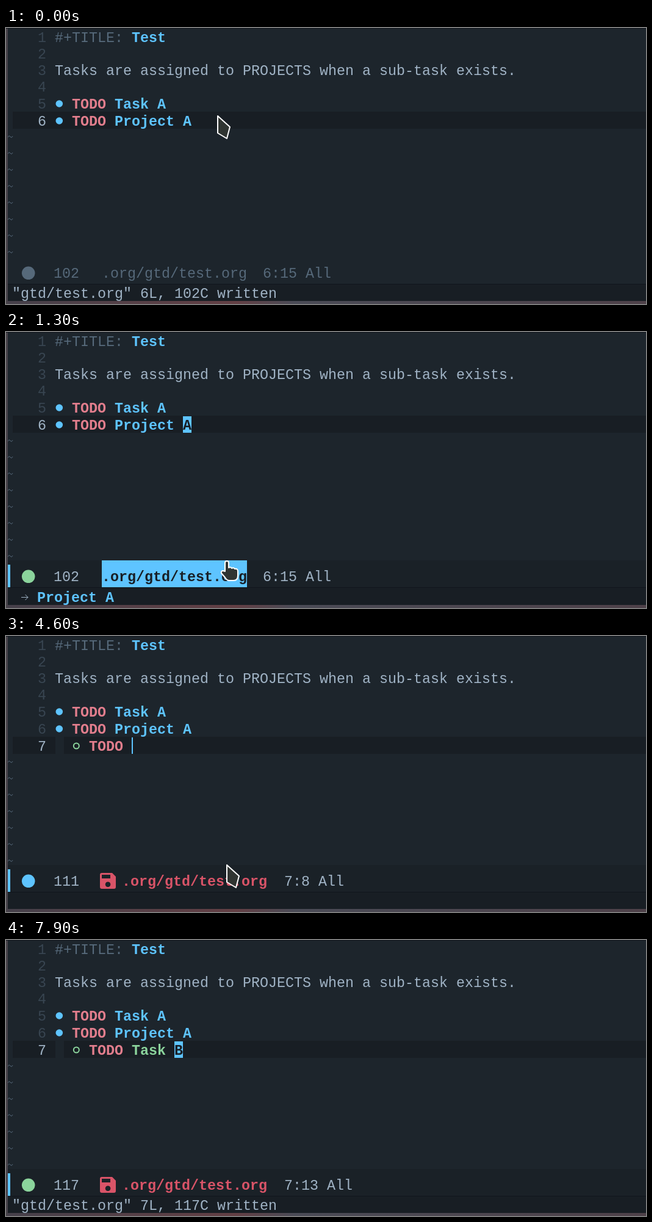
An HTML page with a canvas for the animation above (8000 ms loop, 1049 by 452 pixels).

```html
<!DOCTYPE html>
<html lang="en">
<meta charset="utf-8">
<title>Outline editor</title>
<style>
  html, body { margin: 0; width: 100%; height: 100%; overflow: hidden; background: #1d252c; }
  canvas { display: block; }
</style>
<canvas id="stage" width="1049" height="452"></canvas>
<script>
const ctx = document.getElementById('stage').getContext('2d');
const LOOP = 8000, CELL = 14, LEFT = 80;
const C = {
  bg: '#1d252c', dark: '#181e24', bar: '#1a2127', region: '#28323b', line: '#10151c',
  text: '#a0b3c5', dim: '#56697a', number: '#384551', blue: '#5ec4ff', path: '#539afc',
  pink: '#e27e8d', red: '#d95468', green: '#8bd49c', yellow: '#ebbf83', cyan: '#70e1e8'
};
const lineTop = [1, 28, 55, 82, 109, 137, 165];

// Each cue changes only the listed properties.
const cues = [
  [0, { mode: 'inactive', row: 6, count: 102, pos: '6:15', echo: '"gtd/test.org" 6L, 102C written',
        topic: '', task: null, level: 1, dirty: false, hover: false, mouse: [347, 144] }],
  [600, { mode: 'visual', pos: '6:16', echo: '' }],
  [700, { mode: 'normal', pos: '6:15' }],
  [900, { mouse: [362, 375] }],
  [1300, { hover: true, topic: 'Project A' }],
  [2200, { row: 5, pos: '5:12' }],
  [2800, { topic: 'Task A' }],
  [3000, { row: 6, pos: '6:15' }],
  [3500, { topic: 'Project A' }],
  [3700, { mode: 'insert', row: 7, pos: '7:7', count: 110, task: '', dirty: true, hover: false,
           topic: '', echo: '-- INSERT --' }],
  [4600, { level: 2, pos: '7:8', count: 111, echo: '' }],
  [6200, { task: 'T', pos: '7:9', count: 112, mouse: null }],
  [6400, { task: 'Ta', pos: '7:10', count: 113 }],
  [6500, { task: 'Task', pos: '7:12', count: 115 }],
  [6600, { task: 'Task ', pos: '7:13', count: 116 }],
  [6800, { task: 'Task B', pos: '7:14', count: 117 }],
  [7300, { mode: 'normal', pos: '7:13' }],
  [7600, { echo: 'SPC-' }],
  [7800, { echo: 'SPC f-' }],
  [7900, { echo: '"gtd/test.org" 7L, 117C written' }]
];
const lamp = { inactive: C.dim, visual: C.yellow, normal: C.green, insert: C.blue };
const cursorCol = { 5: 12, 6: 15, 7: 14 };

const col = n => LEFT + n * CELL;

function rect(x, y, w, h, color) {
  ctx.fillStyle = color;
  ctx.fillRect(x, y, w, h);
}

function text(str, x, y, color, bold) {
  ctx.font = `${bold ? 'bold ' : ''}23.33px "Liberation Mono", monospace`;
  ctx.fillStyle = color;
  ctx.fillText(str, x, y);
}

function dot(x, y, r, color, hollow) {
  ctx.beginPath();
  ctx.arc(x, y, r, 0, 7);
  ctx.fillStyle = ctx.strokeStyle = color;
  ctx.lineWidth = 2;
  hollow ? ctx.stroke() : ctx.fill();
}

function shape(d, x, y, fill, stroke) {
  const path = new Path2D(d);
  ctx.save();
  ctx.translate(x, y);
  if (fill) { ctx.fillStyle = fill; ctx.fill(path, 'evenodd'); }
  if (stroke) {
    ctx.strokeStyle = stroke;
    ctx.lineWidth = fill ? 2 : 1;
    ctx.lineJoin = 'round';
    ctx.stroke(path);
  }
  ctx.restore();
}

function heading(row, title, level) {
  const y = lineTop[row - 1] + 23, nested = level === 2, indent = nested ? 2 : 0;
  const color = nested ? C.green : C.blue;
  dot(col(indent) + 7.3, y - 8, nested ? 4.5 : 5.8, color, nested);
  text('TODO', col(indent + 2), y, C.pink, true);
  text(title, col(indent + 7), y, color, true);
}

function buffer(s) {
  const lines = s.task === null ? 6 : 7;
  const top = lineTop[s.row - 1];
  rect(11, top, 1038, 28, C.dark);
  if (s.mode === 'visual') {
    rect(81, top, 223, 28, C.bg);
    rect(304, top, 745, 28, C.region);
  }
  if (s.level === 2) rect(81, top, 14, 28, C.bg);

  for (let n = 1; n <= lines; n++)
    text(n, 52, lineTop[n - 1] + (n < 5 ? 22 : 23), n === s.row ? C.text : C.number);
  text('#+TITLE:', col(0), 23, C.dim);
  text('Test', col(9), 23, C.blue, true);
  text('Tasks are assigned to PROJECTS when a sub-task exists.', col(0), 77, C.text);
  heading(5, 'Task A', 1);
  heading(6, 'Project A', 1);
  if (lines === 7) heading(7, s.task, s.level);

  for (let y = lines === 7 ? 206 : 178; y < 375; y += 27)
    shape('M3 1q2-4 4-1t4-1', 0, y, null, C.dim);

  if (s.mode === 'visual') {
    ctx.strokeStyle = C.blue;
    ctx.lineWidth = 1;
    ctx.strokeRect(304.5, top + 0.5, 13, 27);
  } else if (s.mode === 'insert') {
    rect(col((s.level === 2 ? 9 : 7) + s.task.length), top + 1, 2, 27, C.blue);
  } else if (s.mode === 'normal') {
    const x = col(cursorCol[s.row]);
    rect(x, top + 1, CELL, 27, C.blue);
    text(s.row === 7 ? 'B' : 'A', x, top + 23, C.dark, true);
  }
}

function modeline(s) {
  const up = s.hover ? 1 : 0, y = 409 - up, active = s.mode !== 'inactive';
  const color = active ? C.text : C.dim, x = s.dirty ? 190 : 157;
  if (active) {
    rect(3, 375 - up, 1046, 44, C.bar);
    rect(3, 382 - up, 4, 37, C.blue);
  }
  rect(3, 419 - up, 1046, 1, C.line);
  dot(36.7, 401.3 - up, 10.8, lamp[s.mode]);
  text(s.count, 78, y, color);

  if (s.hover) {
    rect(157, 374, 238, 44, C.blue);
    text('.org/gtd/test.org', x, y, C.dark, true);
  } else if (s.dirty) {
    shape('M3 0H20L26 6V23Q26 26 23 26H3Q0 26 0 23V3Q0 0 3 0ZM3 3V9H17V3ZM13 14.5a4.3 4.3 0 1 0 .1 0Z', 154, 388, C.red);
    text('.org/gtd/test.org', x, y, C.red, true);
  } else if (active) {
    text('.org/', x, y, C.path, true);
    text('gtd/', x + 5 * CELL, y, C.blue, true);
    text('test.org', x + 9 * CELL, y, C.text, true);
  } else {
    text('.org/gtd/test.org', x, y, C.dim);
  }

  const end = s.dirty ? 456 : 421;
  text(s.pos + ' All', end, y, color);
  if (s.mode === 'visual') text('1C', end + 9 * CELL, y, C.cyan);
}

function echoArea(s) {
  const top = s.hover ? 419 : 420;
  rect(3, top, 1046, 447 - top, C.dark);
  text(s.echo, 10, 442, C.text);
  if (s.topic) {
    shape('M25 434.5H36M31.5 430L36 434.5L31.5 439', 0, 0, null, C.text);
    text(s.topic, 51, 442, C.blue, true);
  }
}

function windowEdge() {
  const edge = ctx.createLinearGradient(0, 0, 1049, 0);
  edge.addColorStop(0, '#45404a');
  edge.addColorStop(0.36, '#633f44');
  edge.addColorStop(0.45, '#4a4b56');
  edge.addColorStop(1, '#4e4149');
  rect(0, 447, 1049, 5, edge);
  rect(0, 0, 3, 452, '#474249');
  rect(0, 0, 1049, 1, C.line);
}

function pointer(s) {
  if (!s.mouse) return;
  if (s.hover)
    shape('M6 17V3Q6 0 9 0T12 3V11Q15 9 17 12Q20 10 22 13Q27 12 27 17V24Q27 32 20 32H13Q9 32 6 27L0 20Q-1 16 3 16Z',
      353, 375, '#303532', '#fff');
  else
    shape('M0 0L20 18L15 37L0 28Z', ...s.mouse, '#303532', '#fff');
}

function draw(now) {
  const t = now % LOOP;
  const s = Object.assign({}, ...cues.filter(c => c[0] <= t).map(c => c[1]));
  rect(0, 0, 1049, 452, C.bg);
  buffer(s);
  modeline(s);
  echoArea(s);
  windowEdge();
  pointer(s);
}

const start = performance.now();
function tick() {
  draw(performance.now() - start);
  requestAnimationFrame(tick);
}
tick();
</script>
</html>
```
